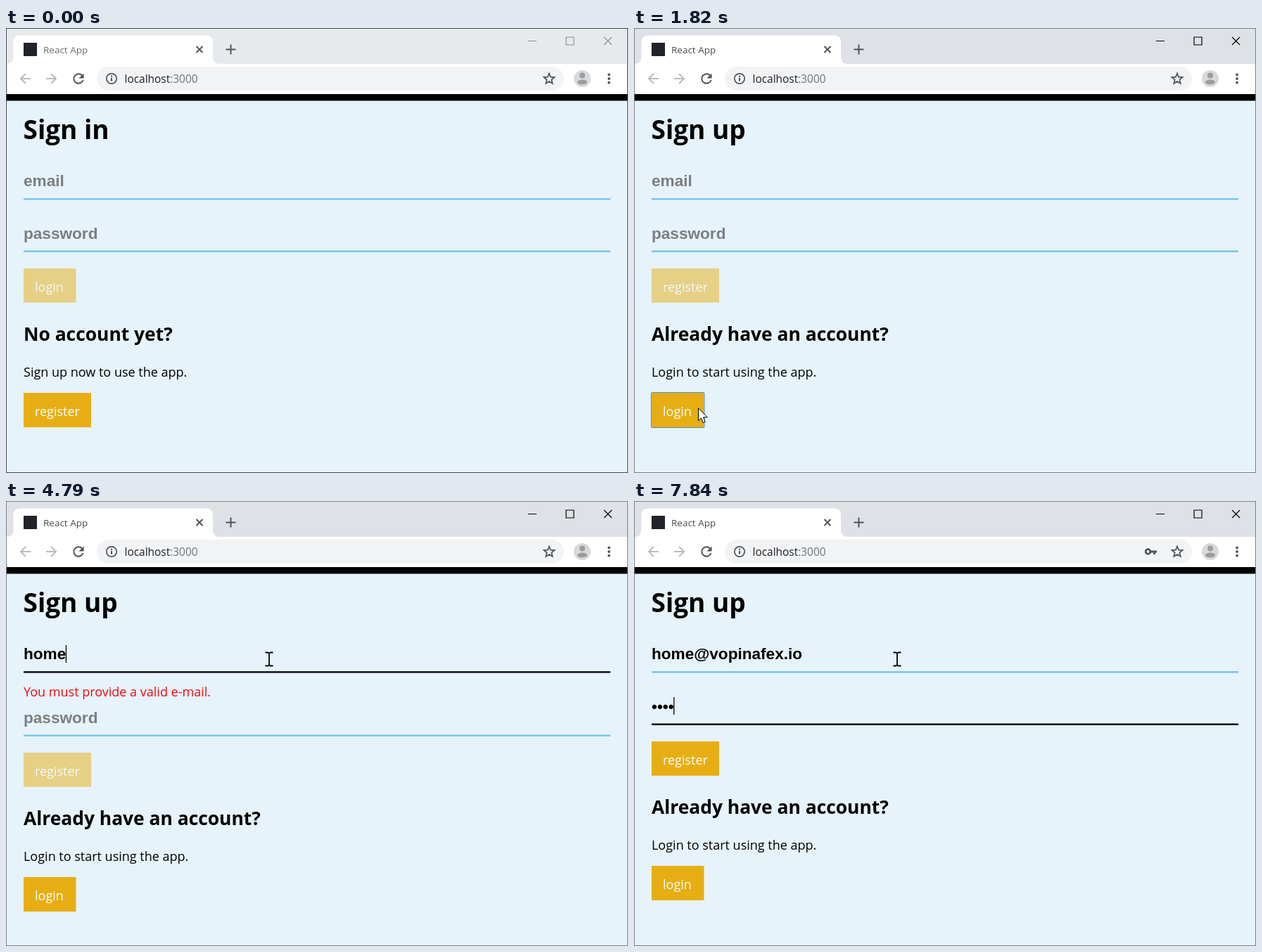
Write an HTML page that moves like this. It is 884 by 633 pixels and loops after 8000 ms.

```html
<!DOCTYPE html>
<html lang="en">
<head>
<meta charset="utf-8">
<title>Sign up form</title>
<style>
  html, body { margin: 0; width: 100%; height: 100%; overflow: hidden; }
  svg { display: block; width: 884px; height: 633px; font: 18px "Open Sans", "Noto Sans", sans-serif; }
  .line { fill: none; stroke: #505357; stroke-width: 2; }
  .off { stroke: #b9bbbe; }
  .h1 { font-size: 37px; font-weight: 700; }
  .h2 { font-size: 26.4px; font-weight: 700; }
  .field { font: 700 22.6px "Liberation Sans", Arial, sans-serif; }
  .hint { fill: #7c7e80; }
  .btn rect { fill: #e7ae14; }
  .btn text { fill: #fff; }
  .rule { fill: #72c1e7; }
  .rule.on { fill: #000; }
  #frame { fill: #e7eaed; }
  #title { fill: #6b6e72; font-size: 13.5px; }
  #controls { fill: none; stroke: #8e9194; stroke-width: 1.2; }
  #edge { fill: none; stroke: #45484b; }
  .active #frame { fill: #dee1e6; }
  .active #title { fill: #45494d; }
  .active #controls { stroke: #000; }
  .active #edge { stroke: #7b7d80; }
</style>
</head>
<body>
<svg id="stage" viewBox="0 0 884 633">
  <!-- browser window -->
  <rect id="frame" width="884" height="52"/>
  <path fill="#fff" d="M0 51Q10.5 51 10.5 41V20Q10.5 10.5 20 10.5H284Q294 10.5 294 20V41Q294 51 304 51H884V94H0Z"/>
  <rect x="25" y="21" width="19" height="19" fill="#20232a"/>
  <text id="title" x="53" y="35.5">React App</text>
  <path class="line" stroke-width="1.8" d="M270.5 26l9 9m0-9l-9 9"/>
  <path class="line" d="M312.5 30.5h14m-7-7v14"/>
  <path id="controls" d="M742 18.5h12M796 13h11v11h-11zM850 13l11 11m0-11l-11 11"/>
  <path class="line off" d="M35 72H21m7-7l-7 7 7 7M57 72h14m-7-7l7 7-7 7"/>
  <path class="line" d="M108 67.2A6.8 6.8 0 1 0 109.6 74"/>
  <path fill="#505357" d="M110.5 64.5v7h-7z"/>
  <rect x="129" y="55" width="664" height="34" rx="17" fill="#f1f3f4"/>
  <circle class="line" style="stroke-width:1.7" cx="150" cy="72" r="7.2"/>
  <path class="line" d="M150 71v4.5M150 67.7v2"/>
  <text x="168.500" y="77.500" font-size="15.450" fill="#202124">localhost<tspan fill="#707478">:3000</tspan></text>
  <g id="key">
    <circle class="line" style="stroke-width:2.8" cx="730.500" cy="72" r="3.300"/>
    <path class="line" style="stroke-width:2.800" d="M734 72h9M739.500 72v4"/>
  </g>
  <path id="star" class="line" style="stroke-width:1.700"/>
  <circle cx="819" cy="72" r="12" fill="#d7d9db"/>
  <g fill="#9b9d9f">
    <circle cx="819" cy="67.500" r="4"/>
    <ellipse cx="819" cy="77" rx="7" ry="3.600"/>
  </g>
  <g fill="#505357">
    <circle cx="857" cy="66.300" r="1.900"/>
    <circle cx="857" cy="72" r="1.900"/>
    <circle cx="857" cy="77.700" r="1.900"/>
  </g>

  <!-- page -->
  <rect y="94" width="884" height="539" fill="#e6f3fa"/>
  <rect y="94" width="884" height="9.500"/>
  <text id="heading" class="h1" x="24.500" y="158"></text>
  <text id="mailHint" class="field hint" x="25" y="225">email</text>
  <text id="mail" class="field" x="25" y="225"></text>
  <rect id="mailRule" class="rule" x="25" y="242.200" width="834" height="2.300"/>
  <text id="error" x="25" y="278" fill="#f5070e">You must provide a valid e-mail.</text>
  <g id="rest">
    <text id="passHint" class="field hint" x="25" y="299.500">password</text>
    <text id="pass" class="field" x="25" y="299.500"></text>
    <rect id="passRule" class="rule" x="25" y="316.500" width="834" height="2.300"/>
    <g id="submit" class="btn"><rect x="25" y="342" height="48.700"/><text x="41" y="374.500"></text></g>
    <text id="question" class="h2" x="25" y="444.500"></text>
    <text id="advice" x="25" y="495.500"></text>
    <g id="swap" class="btn"><rect x="25" y="519" height="49"/><text x="41" y="551.500"></text></g>
    <rect id="ring" x="24.500" y="518.500" height="50" rx="1" fill="none" stroke="#4a90d9"/>
  </g>
  <rect id="caret" width="1.300" height="25"/>
  <rect id="edge" x=".5" y=".5" width="883" height="632"/>

  <path id="arrow" fill="#fff" stroke="#000" d="M.5 .8V18.700L4.500 14.900L7.200 21.500L10.200 20.200L7.500 13.800H13.300Z"/>
  <path id="beam" fill="none" stroke="#000" stroke-width="1.800" d="M-5.500 -9.500H-2L0 -8.500L2 -9.500H5.500M0 -8.500V8.500M-5.500 9.500H-2L0 8.500L2 9.500H5.500"/>
</svg>
<script>
const LOOP = 8000;
const ADDRESS = "home@vopinafex.io";
const MAIL_KEYS = [4370, 4590, 4640, 4790, 4990, 5190, 5280, 5440, 5580,
                   5680, 5930, 6130, 6220, 6380, 6420, 6650, 6830];
const PASS_KEYS = [7240, 7390, 7670, 7840];
const ENTER = 720, ACTIVATE = 1600, SIGN_UP = 1740;
const FOCUS_MAIL = 3750, CARET_OFF = 4250, FOCUS_PASS = 6930;

// time, x, y of the pointer
const PATH = [
  [720, 206, 618], [890, 138, 567], [1100, 108, 550], [1470, 91, 540],
  [2480, 91, 540], [2790, 306, 297], [3110, 306, 297], [3160, 315, 281],
  [3450, 356, 243], [3700, 374, 225], [LOOP, 374, 225]
];

const $ = id => document.getElementById(id);
const show = (id, on) => $(id).setAttribute("visibility", on ? "visible" : "hidden");
const place = (id, x, y) => $(id).setAttribute("transform", `translate(${x} ${y})`);
const count = (keys, t) => keys.filter(k => k <= t).length;

function write(id, text) {
  if ($(id).textContent !== text) $(id).textContent = text;
}

function button(id, label) {
  const [box, text] = $(id).children;
  if (text.textContent !== label) text.textContent = label;
  box.setAttribute("width", label === "login" ? 74.5 : 96);
}

function pointerAt(t) {
  const i = Math.max(1, PATH.findIndex(p => p[0] > t));
  const [t0, x0, y0] = PATH[i - 1], [t1, x1, y1] = PATH[i];
  const k = (t - t0) / (t1 - t0);
  return [x0 + (x1 - x0) * k, y0 + (y1 - y0) * k];
}

function drawPointer(t) {
  const [x, y] = pointerAt(t);
  const inField = (y > 193 && y < 245) || (y > 267 && y < 319);
  show("arrow", t >= ENTER && !inField);
  show("beam", t >= ENTER && inField);
  place("arrow", x, y);
  place("beam", x, y);
}

function drawPage(t) {
  const signUp = t >= SIGN_UP;
  write("heading", signUp ? "Sign up" : "Sign in");
  write("question", signUp ? "Already have an account?" : "No account yet?");
  write("advice", signUp ? "Login to start using the app." : "Sign up now to use the app.");
  button("submit", signUp ? "register" : "login");
  button("swap", signUp ? "login" : "register");
  $("ring").setAttribute("width", signUp ? 75.5 : 97);
  show("ring", t >= ACTIVATE && t < FOCUS_MAIL);
}

function drawForm(t) {
  const typed = count(MAIL_KEYS, t), dots = count(PASS_KEYS, t);
  const invalid = typed > 0 && typed < ADDRESS.length;
  const onPass = t >= FOCUS_PASS;
  write("mail", ADDRESS.slice(0, typed));
  write("pass", "•".repeat(dots));
  show("mailHint", !typed);
  show("passHint", !dots);
  show("error", invalid);
  show("key", dots);
  place("rest", 0, invalid ? 16 : 0);
  $("submit").setAttribute("opacity", dots ? 1 : 0.5);
  $("mailRule").classList.toggle("on", t >= FOCUS_MAIL && !onPass);
  $("passRule").classList.toggle("on", onPass);

  const filled = onPass ? dots : typed;
  const width = filled ? $(onPass ? "pass" : "mail").getComputedTextLength() : 0;
  $("caret").setAttribute("x", 25 + width - 0.5);
  $("caret").setAttribute("y", onPass ? 279 : 205);
  show("caret", t >= FOCUS_MAIL && (t < CARET_OFF || typed));
}

function draw() {
  const t = performance.now() % LOOP;
  $("stage").classList.toggle("active", t >= ACTIVATE);
  drawPage(t);
  drawForm(t);
  drawPointer(t);
  requestAnimationFrame(draw);
}

const star = Array.from({ length: 10 }, (_, i) => {
  const a = i * Math.PI / 5, r = i % 2 ? 3.5 : 8;
  return [772 + r * Math.sin(a), 72.5 - r * Math.cos(a)];
});
$("star").setAttribute("d", "M" + star.join("L") + "Z");
draw();
</script>
</body>
</html>
```
